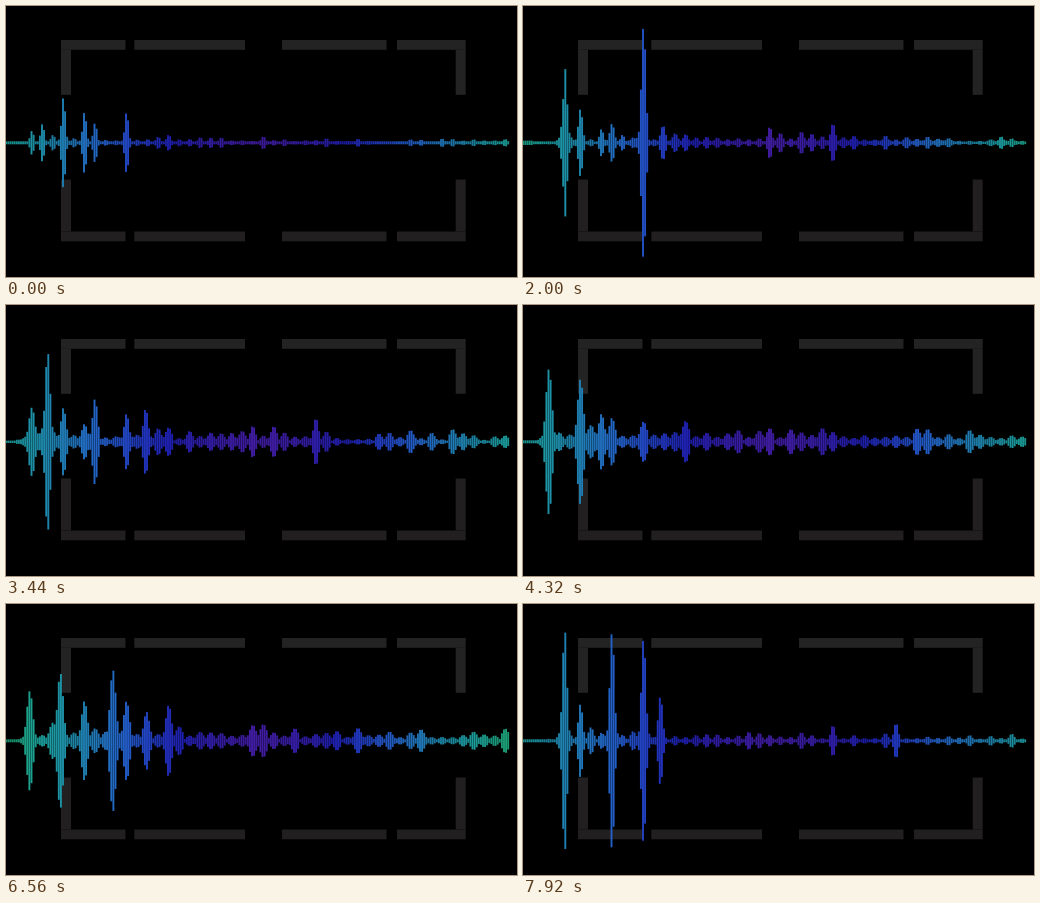
Recreate the animation shown at these times as an HTML page with a canvas. Size 511 by 271 pixels, loop 8000 ms.

```html
<!DOCTYPE html>
<html lang="en">
<head>
<meta charset="utf-8">
<title>Audio spectrum</title>
<style>
  html, body { margin: 0; width: 100%; height: 100%; overflow: hidden; background: #000; }
  canvas { display: block; width: 511px; height: 271px; }
</style>
</head>
<body>
<canvas id="stage" width="511" height="271"></canvas>
<script>
const ctx = document.getElementById('stage').getContext('2d');
const STEP = 80, STEPS = 100;
const BARS = 240, PITCH = 2.1, MIDDLE = 136.8;
const SLOT = 10.52, SLOT_START = 4.9;   // notes sit on an even grid of slots
const HELD = [57, 66, 86, 87];          // steps that repeat the picture before them

// Only the loudest notes are set, as slot: half height. The rest is seeded.
const poses = [
  { step: 0, edgeHue: 176, width: 2.6, notes: { 2: 12, 3: 19, 5: 46, 7: 31, 8: 20, 11: 31 } },
  { step: 16, edgeHue: 156, width: 2.8, notes: { 5: 48, 7: 38, 9: 18, 11: 63, 13: 16, 23: 13 } },
  { step: 33, edgeHue: 180, width: 3.2, notes: { 3.5: 107, 5: 47, 8: 46, 11: 87, 12.8: 43, 23: 20, 29: 24 } },
  { step: 54, edgeHue: 176, width: 4.1, notes: { 2: 73, 5: 63, 7: 28, 8: 24 } },
  { step: 69, edgeHue: 172, width: 2.9, notes: { 2: 38, 5: 128, 7: 38, 8: 32, 11: 77, 15: 38, 33: 20 } },
  { step: 82, edgeHue: 158, width: 4.1, notes: { 1.8: 50, 4.7: 68, 7: 40, 9.7: 71, 11: 40, 12.9: 29, 15: 36 } },
  { step: 99, edgeHue: 182, width: 3.1, notes: { 3.5: 112, 5: 37, 8: 110, 11: 104, 12.6: 45, 29: 16, 35: 18 } }
];

function random(a, b) {
  const v = Math.sin(a * 127.1 + b * 311.7) * 43758.5453;
  return v - Math.floor(v);
}
const mix = (a, b, u) => a + (b - a) * u;
const bell = (distance, width) => Math.exp(-((distance / width) ** 2));
const barX = i => 0.3 + PITCH * i;
const slotX = slot => SLOT_START + SLOT * slot;
const nearestSlot = x => Math.round((x - SLOT_START) / SLOT);

// Quiet notes: even ripple along the line, swelling around the low notes.
function quietNote(slot, pose) {
  const swell = 1.3 * slot / 8 * Math.exp(1 - slot / 8);
  const chance = random(slot, pose.step) ** 2;
  return 2.6 * (pose.width - 1.5) * Math.min(1, slot / 4) * (0.5 + 1.3 * chance + swell * (0.3 + chance));
}

function poseHeights(pose) {
  const notes = Object.entries(pose.notes);
  return Array.from({ length: BARS }, (_, i) => {
    const x = barX(i), slot = Math.max(0, nearestSlot(x));
    let height = quietNote(slot, pose) * bell(x - slotX(slot), pose.width * 1.2);
    for (const [place, size] of notes) {
      const d = x - slotX(Number(place));
      height = Math.max(height, size * bell(d, pose.width), size * 0.16 * bell(d, pose.width * 2));
    }
    return Math.max(1.5, height);
  });
}
for (const pose of poses) pose.heights = poseHeights(pose);

function barColor(x, height, edgeHue) {
  const hue = mix(256, edgeHue, (Math.abs(x - 252) / 252) ** 1.5);
  const light = (37 + 9 * bell(hue - 220, 22)) * mix(0.88, 1, Math.min(1, height / 12));
  return `hsl(${hue}, 70%, ${light}%)`;
}

function drawBrackets() {
  const spans = [[55, 119.5], [128.3, 239], [276, 380.5], [391, 459.7]];
  const rows = [
    { color: '#232323', y: 34, sideY: 43.8, sideHeight: 45 },
    { color: '#211f1f', y: 225.5, sideY: 173.5, sideHeight: 52 }
  ];
  for (const { color, y, sideY, sideHeight } of rows) {
    ctx.fillStyle = color;
    for (const [left, right] of spans) ctx.fillRect(left, y, right - left, 9.8);
    for (const x of [55, 449.7]) ctx.fillRect(x, sideY, 10, sideHeight);
  }
}

function drawBars(step) {
  const next = Math.max(1, poses.findIndex(p => p.step >= step));
  const from = poses[next - 1], to = poses[next];
  const u = (step - from.step) / (to.step - from.step);
  const edgeHue = mix(from.edgeHue, to.edgeHue, u);
  const liveliness = Math.min(1, 4 * u * (1 - u));
  for (let i = 0; i < BARS; i++) {
    const x = barX(i);
    const beat = 1 + liveliness * (random(nearestSlot(x), step + 7) - 0.45) * 1.1;
    const height = Math.min(135, Math.max(1.2, mix(from.heights[i], to.heights[i], u) * beat));
    ctx.fillStyle = barColor(x, height, edgeHue);
    ctx.fillRect(x - 0.95, MIDDLE - height, 1.9, height * 2);
  }
}

function draw(now) {
  let step = Math.floor(now / STEP) % STEPS;
  while (HELD.includes(step)) step--;
  ctx.fillStyle = '#000';
  ctx.fillRect(0, 0, 511, 271);
  drawBrackets();
  drawBars(step);
  requestAnimationFrame(() => draw(performance.now() - start));
}
const start = performance.now();
draw(0);
</script>
</body>
</html>
```
